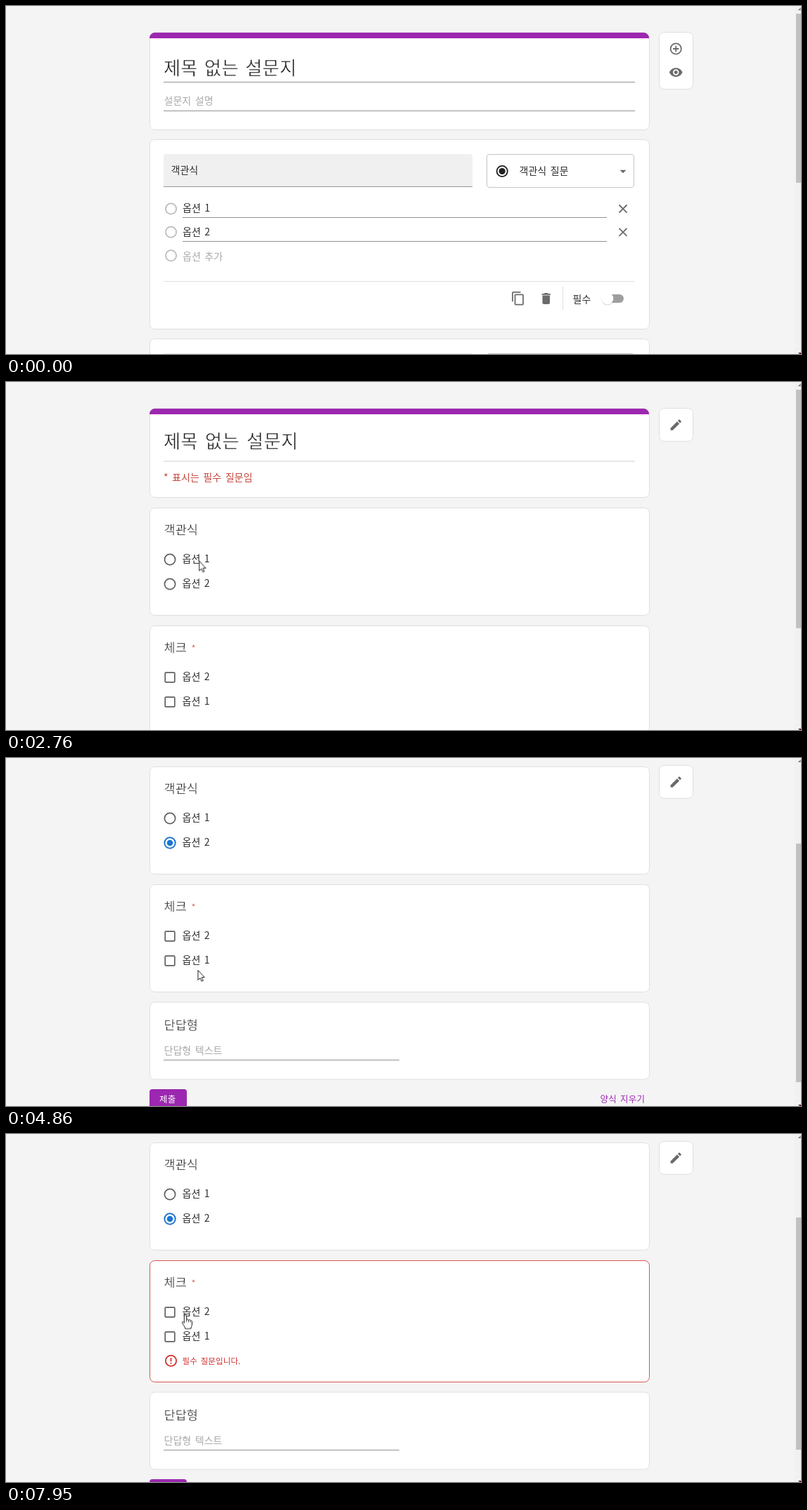
These frames come from a looping animation (1130x496 px, 8 s). An HTML page:

```html
<!DOCTYPE html>
<html lang="ko">
<head>
<meta charset="utf-8">
<title>설문지</title>
<style>
html, body { margin: 0; width: 100%; height: 100%; overflow: hidden; background: #f4f4f4; }
svg { display: block; width: 1130px; height: 496px; }

text { font: 350 14px "Noto Sans CJK KR", "Noto Sans CJK", sans-serif; fill: #2e2e2e; letter-spacing: .05px; word-spacing: 1.5px; }
.title { font-size: 26px; font-weight: 300; letter-spacing: .4px; word-spacing: 1.8px; fill: #1c1c1c; stroke: #fff; stroke-width: .5px; }
.view .title { letter-spacing: .5px; word-spacing: 2.4px; }
.ask { font-size: 17.5px; stroke: #fff; stroke-width: .3px; }
.hint { fill: #a9a9a9; }
.red { fill: #c5443b; }
.small { font-size: 11.5px; letter-spacing: .1px; fill: #d32f2f; }
.btn { font-size: 12.5px; letter-spacing: .2px; fill: #9c27b0; }

.card { fill: #fff; stroke: #dfdfdf; }
.band { fill: #9c27b0; }
.line { stroke: #929292; }
.rule { stroke: #e0e0e0; }
.icon { fill: #6b6b6b; }
.out { fill: none; stroke: #6b6b6b; stroke-width: 1.8; }
.pale { fill: none; stroke: #bdbdbd; stroke-width: 1.8; }
.box { fill: none; stroke: #606060; stroke-width: 1.7; }
.blue { fill: #1976d2; }
.ring { fill: #fff; stroke: #1976d2; stroke-width: 1.8; }
.tick { fill: none; stroke: #fff; stroke-width: 1.9; }
.bad { fill: none; stroke: #d32f2f; }
.halo { fill: #1976d2; fill-opacity: .045; }
.mouse path { fill: #fff; stroke: #1a1a1a; stroke-linejoin: round; }
.mouse .crease { fill: none; stroke-width: .8; }

/* hard switches */
.edit, .view, .r1, .r2, .c1, .c2, .error, .h1, .h2, .arrow, .hand, .click { animation: 8s step-end infinite; }
.edit { animation-name: edit; }
.view { animation-name: view; }
.r1 { animation-name: r1; }
.r2 { animation-name: r2; }
.c1 { animation-name: c1; }
.c2 { animation-name: c2; }
.h1 { animation-name: h1; }
.h2 { animation-name: h2; }
.error { animation-name: error; }
.arrow { animation-name: arrow; }
.hand { animation-name: hand; }
.click { animation-name: click; }
.tail { animation: tail 8s step-end infinite; }
@keyframes edit { 0% { opacity: 1 } 17.375%, 100% { opacity: 0 } }
@keyframes view { 0% { opacity: 0 } 17.375%, 100% { opacity: 1 } }
@keyframes r1 { 0%, 50.87% { opacity: 0 } 40.5% { opacity: 1 } }
@keyframes r2 { 0% { opacity: 0 } 50.87%, 100% { opacity: 1 } }
@keyframes c2 { 0%, 97.37% { opacity: 0 } 67.5% { opacity: 1 } }
@keyframes c1 { 0%, 89.87% { opacity: 0 } 77.75% { opacity: 1 } }
@keyframes h1 { 0%, 46.7% { opacity: 0 } 36.9% { opacity: 1 } }
@keyframes h2 { 0%, 52.6% { opacity: 0 } 46.7% { opacity: 1 } }
@keyframes error { 0% { opacity: 0 } 97.37%, 100% { opacity: 1 } }
@keyframes tail { 0% { transform: none } 97.37%, 100% { transform: translateY(20px) } }
@keyframes arrow {
  0%, 12.12%, 35.37%, 63% { opacity: 0 }
  1.62%, 19%, 58.5% { opacity: 1 }
}
@keyframes hand {
  0%, 19%, 58.5% { opacity: 0 }
  12.12%, 35.37%, 63%, 100% { opacity: 1 }
}
@keyframes click {
  0%, 17.37%, 40.9%, 50.87%, 67.5%, 77.75%, 89.87%, 96.6% { opacity: 0 }
  16.5%, 39.62%, 50%, 66.75%, 76.62%, 87.37%, 95.6% { opacity: 1 }
}

/* motion */
.mouse { animation: mouse 8s ease-in-out infinite; }
@keyframes mouse {
  0%, 1.62% { transform: translate(1087px, 447px) }
  11.25%, 12.1% { transform: translate(969px, 114px) }
  13%, 25.5% { transform: translate(957px, 96px) }
  35.37%, 36% { transform: translate(264px, 257px) }
  37.1%, 45.6% { transform: translate(244px, 249px) }
  47.5%, 50.8% { transform: translate(244px, 292px) }
  55.25%, 61% { transform: translate(272.5px, 302px) }
  64.8%, 71% { transform: translate(275px, 256px) }
  74.1%, 82.6% { transform: translate(261px, 292px) }
  83.25%, 86% { transform: translate(261px, 293px) }
  86.5%, 89.9% { transform: translate(263px, 293px) }
  94.6%, 100% { transform: translate(255px, 257.5px) }
}
.page { animation: page 8s linear infinite; }
@keyframes page {
  0%, 55.6% { transform: none }
  57%, 58% { transform: translateY(-19px) }
  60.4%, 100% { transform: translateY(-167px) }
}
.dock { animation: dock 8s linear infinite; }
@keyframes dock {
  0%, 55.6% { transform: none }
  57%, 58% { transform: translateY(-19px) }
  58.15%, 100% { transform: translateY(-27px) }
}
.thumb { fill: #c1c1c1; animation: thumb 8s linear infinite; }
@keyframes thumb {
  0%, 17.37% { y: 11px; height: 241px }
  17.375%, 55.6% { y: 11px; height: 340px }
  57%, 58% { y: 23px; height: 340px }
  60.4%, 97.37% { y: 122px; height: 340px }
  97.375%, 100% { y: 119px; height: 331px }
}
.wave { fill: #1976d2; transform-box: fill-box; transform-origin: center; opacity: 0; animation: 8s ease-out infinite; }
.w1 { animation-name: wave1; }
.w2 { animation-name: wave2; }
@keyframes wave1 {
  0%, 39.6% { opacity: 0; transform: scale(.2) }
  40.5% { opacity: .14; transform: scale(.7) }
  42.2% { opacity: .08; transform: scale(1) }
  44.1%, 100% { opacity: 0; transform: scale(1) }
}
@keyframes wave2 {
  0%, 50% { opacity: 0; transform: scale(.2) }
  50.9% { opacity: .14; transform: scale(.7) }
  52.5% { opacity: .08; transform: scale(1) }
  54.4%, 100% { opacity: 0; transform: scale(1) }
}
</style>
</head>
<body>
<svg viewBox="0 0 1130 496">
  <defs>
    <path id="band" d="M204 46V45.500a7.500 7.500 0 0 1 7.500-7.500H906.500a7.500 7.500 0 0 1 7.500 7.500V46Z"/>
    <path id="cross" d="M-5.500-5.500 5.500 5.500M5.500-5.500-5.500 5.500"/>
    <rect id="box" x="-6.800" y="-6.800" width="13.600" height="13.600" rx="1"/>
    <g id="dot"><circle class="ring" r="7.600"/><circle class="blue" r="4.300"/></g>
    <g id="check"><rect class="blue" x="-7.800" y="-7.800" width="15.600" height="15.600" rx="1.800"/><path class="tick" d="M-5 .2-1.700 3.500 5.100-3.500"/></g>
  </defs>

  <rect width="1130" height="496" fill="#f4f4f4"/>

  <g class="edit">
    <rect class="card" x="204.500" y="37.500" width="710" height="139" rx="7"/>
    <use href="#band" class="band"/>
    <text class="title" x="224" y="98">제목 없는 설문지</text>
    <path class="line" d="M224 108.500H894M224 149.500H894"/>
    <text class="hint" x="224.500" y="140">설문지 설명</text>

    <rect class="card" x="204.500" y="190.500" width="710" height="270" rx="7"/>
    <path fill="#f0f0f0" d="M224 258V215a4 4 0 0 1 4-4H659a4 4 0 0 1 4 4V258Z"/>
    <path class="line" d="M224 257.500H663"/>
    <text x="234.500" y="239">객관식</text>
    <rect x="683.500" y="211.500" width="209" height="47" rx="3.500" fill="#fff" stroke="#c4c4c4"/>
    <circle cx="705.200" cy="235.500" r="7.600" fill="none" stroke="#1f1f1f" stroke-width="1.800"/>
    <circle cx="705.200" cy="235.500" r="4.600" fill="#1f1f1f"/>
    <text x="729.500" y="240">객관식 질문</text>
    <path class="icon" d="M872.500 233.800h9l-4.500 4.500Z"/>

    <circle class="pale" cx="234.500" cy="289" r="7.600"/>
    <circle class="pale" cx="234.500" cy="322.300" r="7.600"/>
    <circle class="pale" cx="234.500" cy="355.700" r="7.600"/>
    <text x="251" y="293">옵션 1</text>
    <text x="251" y="326.500">옵션 2</text>
    <text class="hint" x="251" y="361.500">옵션 추가</text>
    <path class="line" d="M251 301.500H854M251 335.500H854"/>
    <use href="#cross" class="out" x="877" y="289"/>
    <use href="#cross" class="out" x="877" y="322.300"/>

    <path class="rule" d="M224 392.500H893M791.500 400V433"/>
    <path class="icon" transform="translate(717.400 406.200) scale(.88)" d="M16 1H4c-1.100 0-2 .9-2 2v14h2V3h12V1zm3 4H8c-1.100 0-2 .9-2 2v14c0 1.100.9 2 2 2h11c1.100 0 2-.9 2-2V7c0-1.100-.9-2-2-2zm0 16H8V7h11v14z"/>
    <path class="icon" transform="translate(757.200 406.400) scale(.88)" d="M6 19c0 1.100.9 2 2 2h8c1.100 0 2-.9 2-2V7H6v12zM19 4h-3.500l-1-1h-5l-1 1H5v2h14V4z"/>
    <text x="805.500" y="423">필수</text>
    <rect x="850" y="411" width="28" height="12" rx="6" fill="#9e9e9e"/>
    <circle cx="855" cy="418" r="8.600" fill="#000" fill-opacity=".16"/>
    <circle cx="855" cy="417" r="8.400" fill="#fff"/>

    <rect class="card" x="204.500" y="474.500" width="710" height="60" rx="7"/>
    <path fill="#eaeaea" d="M225 495H662v1H225Z"/>
    <path stroke="#c4c4c4" d="M685 495.500H891"/>

    <rect class="card" x="928.500" y="37.500" width="48" height="81" rx="7"/>
    <circle class="out" cx="952.200" cy="61" r="7.600"/>
    <path class="out" d="M952.200 56.800V65.200M948 61H956.400"/>
    <path class="icon" transform="translate(942 84.300) scale(.85)" d="M12 4.500C7 4.500 2.730 7.610 1 12c1.730 4.390 6 7.500 11 7.500s9.270-3.110 11-7.500c-1.730-4.390-6-7.500-11-7.500zM12 17c-2.760 0-5-2.240-5-5s2.240-5 5-5 5 2.240 5 5-2.240 5-5 5zm0-8c-1.660 0-3 1.340-3 3s1.340 3 3 3 3-1.340 3-3-1.340-3-3-3z"/>
  </g>

  <g class="view">
    <g class="page">
      <rect class="card" x="204.500" y="37.500" width="710" height="127" rx="7"/>
      <use href="#band" class="band"/>
      <text class="title" x="224" y="93.500">제목 없는 설문지</text>
      <path class="rule" stroke-width="1.500" d="M224 113H894"/>
      <text class="red" x="224" y="141">* 표시는 필수 질문임</text>

      <rect class="card" x="204.500" y="179.500" width="710" height="153" rx="7"/>
      <text class="ask" x="224.500" y="217">객관식</text>
      <circle class="halo h1" cx="233" cy="253" r="17"/>
      <circle class="halo h2" cx="233" cy="288" r="17"/>
      <circle class="wave w1" cx="233" cy="253" r="17"/>
      <circle class="wave w2" cx="233" cy="288" r="17"/>
      <circle class="box" cx="233" cy="253" r="7.600"/>
      <circle class="box" cx="233" cy="288" r="7.600"/>
      <g class="r1"><use href="#dot" x="233" y="253"/></g>
      <g class="r2"><use href="#dot" x="233" y="288"/></g>
      <text x="250.500" y="257">옵션 1</text>
      <text x="250.500" y="292">옵션 2</text>

      <rect class="card" x="204.500" y="347.500" width="710" height="153" rx="7"/>
      <g class="error">
        <rect class="card" x="204.500" y="347.500" width="710" height="173" rx="7" style="stroke:#d9534f"/>
        <circle class="bad" cx="234.500" cy="490.300" r="7.600" stroke-width="1.800"/>
        <path class="bad" stroke-width="1.800" d="M234.500 486V491.200M234.500 492.800V494.600"/>
        <text class="small" x="250.500" y="495">필수 질문입니다.</text>
      </g>
      <text class="ask" x="224.500" y="385">체크 <tspan class="red" style="font-size:14px">*</tspan></text>
      <use href="#box" class="box" x="233" y="421"/>
      <use href="#box" class="box" x="233" y="456"/>
      <g class="c2"><use href="#check" x="233" y="421"/></g>
      <g class="c1"><use href="#check" x="233" y="456"/></g>
      <text x="250.500" y="425">옵션 2</text>
      <text x="250.500" y="460">옵션 1</text>

      <g class="tail">
        <rect class="card" x="204.500" y="515" width="710" height="110" rx="7"/>
        <text class="ask" x="224.500" y="553.500">단답형</text>
        <text class="hint" x="224.500" y="588.500">단답형 텍스트</text>
        <path class="line" d="M224 597.500H559"/>
        <rect class="band" x="204" y="639" width="53" height="31" rx="4"/>
        <text class="btn" x="218" y="657.700" style="fill:#fff;font-weight:500">제출</text>
        <text class="btn" x="844.500" y="657.700">양식 지우기</text>
      </g>
    </g>
    <g class="dock">
      <rect class="card" x="928.500" y="37.500" width="48" height="47" rx="7"/>
      <path class="icon" transform="translate(942 51) scale(.85)" d="M3 17.250V21h3.750L17.810 9.940l-3.750-3.750L3 17.250zM20.710 7.040c.39-.39.39-1.020 0-1.410l-2.340-2.340c-.39-.39-1.020-.39-1.410 0l-1.830 1.830 3.750 3.750 1.830-1.830z"/>
    </g>
  </g>

  <rect x="1121" width="9" height="496" fill="#f1f1f1"/>
  <rect class="thumb" x="1123" y="11" width="7" height="241"/>
  <path fill="#777" d="M1125.500 6 1129.500 2.500V6Z"/>
  <path fill="#5b2a2a" d="M1126 494H1130V496H1128Z"/>

  <g class="mouse">
    <circle class="click" r="10" fill="#f8f000" fill-opacity=".68"/>
    <path class="arrow" d="M.4.5V14.500L3.500 11.600 5.500 16.200 7.700 15.300 5.700 10.700H9.800Z"/>
    <g class="hand">
      <path d="M-1.700 12V2a1.700 1.700 0 0 1 3.400 0V7.500a1.500 1.500 0 0 1 2.800.3 1.500 1.500 0 0 1 2.700.7 1.400 1.400 0 0 1 2.200 1.100V14c0 2-1.300 3-1.500 6H-.2C-.5 17-4 13.500-4.600 11.500c-.3-1.500 1.400-2.200 2.900.5Z"/>
      <path class="crease" d="M1.700 7.500V10.500M4.500 7.800V10.800M7.200 8.500V11"/>
    </g>
  </g>
</svg>
</body>
</html>
```
